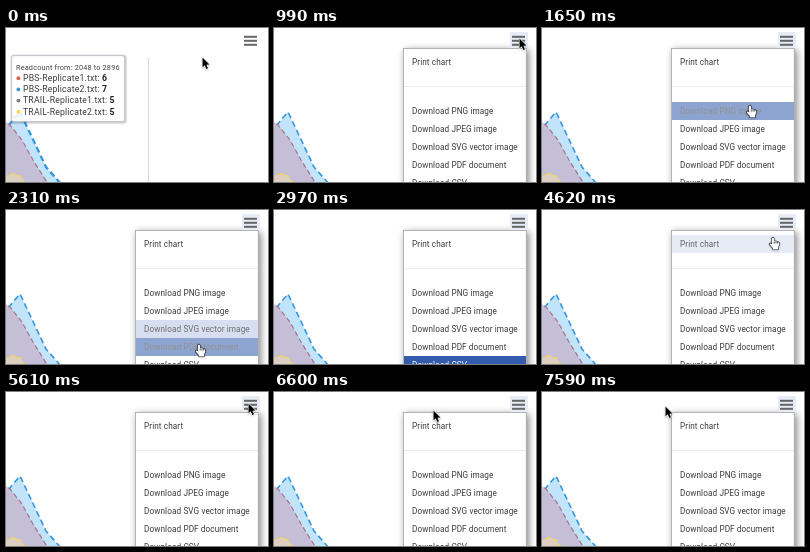
An HTML page with a canvas for the animation above (8000 ms loop, 262x154 px).

```html
<!DOCTYPE html>
<html lang="en">
<head>
<meta charset="utf-8">
<title>Chart export menu</title>
<style>
html, body { margin: 0; width: 100%; height: 100%; overflow: hidden; background: #fff; }
canvas { display: block; width: 262px; height: 154px; }
</style>
</head>
<body>
<canvas id="stage"></canvas>
<script>
const W = 262, H = 154, LOOP = 8000;
const canvas = document.getElementById('stage');
const ctx = canvas.getContext('2d');
const dpr = window.devicePixelRatio || 1;
canvas.width = W * dpr;
canvas.height = H * dpr;

const BLUE = '#3497e0';
const ENTER = .56, LEAVE = .2;
const items = [
  ['Print chart', 25], ['Download PNG image', 74], ['Download JPEG image', 92],
  ['Download SVG vector image', 110], ['Download PDF document', 128], ['Download CSV', 146]
];
const rows = [
  ['PBS-Replicate1.txt: ', 6, '#e2574c'], ['PBS-Replicate2.txt: ', 7, BLUE],
  ['TRAIL-Replicate1.txt: ', 5, '#7b7f88'], ['TRAIL-Replicate2.txt: ', 5, '#f7d442']
];

// at: start time, cur: pointer, hover: row index -> highlight strength
const steps = [
  { at: 0, cur: ['arrow', 196, 29], tip: 1 },
  { at: 330, cur: ['arrow', 229, 17], tip: .5 },
  { at: 660, cur: ['arrow', 245, 10], button: 1 },
  { at: 990, cur: ['arrow', 245, 10], menu: 1 },
  { at: 1320, cur: ['arrow', 211, 45], menu: 1 },
  { at: 1650, cur: ['hand', 204, 77], menu: 1, hover: { 1: ENTER } },
  { at: 1980, cur: ['hand', 196, 113], menu: 1, hover: { 2: LEAVE, 3: ENTER } },
  { at: 2310, cur: ['hand', 189, 134], menu: 1, hover: { 3: LEAVE, 4: ENTER } },
  { at: 2640, cur: ['hand', 188, 150], menu: 1, hover: { 4: LEAVE, 5: ENTER } },
  { at: 2970, menu: 1, hover: { 5: 1 } },
  { at: 3630, cur: ['hand', 197, 139], menu: 1, hover: { 5: ENTER } },
  { at: 3960, cur: ['hand', 201, 128], menu: 1, hover: { 4: ENTER } },
  { at: 4290, cur: ['hand', 216, 78], menu: 1, hover: { 1: ENTER, 2: LEAVE } },
  { at: 4620, cur: ['hand', 227, 27], menu: 1, hover: { 0: .12 } },
  { at: 4950, cur: ['arrow', 240, 15], menu: 1 },
  { at: 5280, cur: ['arrow', 242, 12], menu: 1 },
  { at: 5610, cur: ['arrow', 242, 11], menu: 1 },
  { at: 5940, cur: ['arrow', 245, 11], menu: 1 },
  { at: 6600, cur: ['arrow', 159, 18], menu: 1 },
  { at: 6930, cur: ['arrow', 130, 17], menu: 1 },
  { at: 7260, cur: ['arrow', 108, 2], menu: 1 },
  { at: 7590, cur: ['arrow', 123, 14], menu: 1 }
];

const mix = (a, b, t) => `rgb(${a.map((v, i) => Math.round(v + (b[i] - v) * t))})`;

function text(str, x, y, size, color, spacing, weight = 400) {
  ctx.font = `${weight} ${size}px Roboto, Arial, sans-serif`;
  ctx.letterSpacing = spacing + 'px';
  ctx.fillStyle = color;
  ctx.fillText(str, x, y);
  return ctx.measureText(str).width;
}

function trace(points) {
  ctx.beginPath();
  points.forEach(([x, y]) => ctx.lineTo(x, y));
}

function area(points, fill, stroke, width, dash) {
  trace([...points, [points[points.length - 1][0], 160], [-4, 160]]);
  ctx.fillStyle = fill;
  ctx.fill();
  trace(points);
  ctx.strokeStyle = stroke;
  ctx.lineWidth = width;
  ctx.setLineDash(dash);
  ctx.stroke();
  ctx.setLineDash([]);
}

function shadow(color, blur, dx, dy) {
  ctx.shadowColor = color;
  ctx.shadowBlur = blur * dpr;
  ctx.shadowOffsetX = dx * dpr;
  ctx.shadowOffsetY = dy * dpr;
}

function drawChart(active) {
  area([[-4, 105], [14, 84], [40, 139], [55, 156]], '#c1e4fb', BLUE, active ? 2.3 : 1.6, [6, 3.5]);
  area([[-4, 91], [4, 97], [16, 112], [27, 132], [42, 156]], 'rgba(198,184,210,.85)', '#b0708a', 1.2, [5, 3]);
  area([[-4, 149], [8, 145.5], [14, 148], [20, 156]], 'rgba(226,213,190,.8)', '#f2d54e', 1.4, [5, 3]);
  ctx.fillStyle = '#d8d8d8';
  ctx.fillRect(142, 30, 1, 124);
}

function drawButton(on) {
  if (on) {
    ctx.fillStyle = '#e6ebf5';
    ctx.fillRect(236, 4, 18, 16);
  }
  ctx.fillStyle = '#666';
  for (const y of [7.8, 11.8, 15.8]) ctx.fillRect(238, y, 13, 2);
}

function drawTooltip(alpha) {
  ctx.save();
  ctx.globalAlpha = alpha;
  // stacked translucent outlines make the soft edge
  ctx.strokeStyle = 'rgba(0,0,0,.08)';
  for (const width of [1, 2.5, 4]) {
    ctx.beginPath();
    ctx.roundRect(6.2, 28.2, 113, 66, 2);
    ctx.lineWidth = width;
    ctx.stroke();
  }
  ctx.beginPath();
  ctx.roundRect(5.5, 27.5, 113, 66, 2);
  ctx.fillStyle = 'rgba(255,255,255,.87)';
  ctx.fill();
  ctx.strokeStyle = '#b4bcc4';
  ctx.lineWidth = .7;
  ctx.stroke();
  text('Readcount from: 2048 to 2896', 10, 41.6, 7.3, '#444', .18);
  rows.forEach(([label, value, color], i) => {
    const y = 53 + i * 11.2;
    ctx.beginPath();
    ctx.arc(12.4, y - 2.8, 1.9, 0, 7);
    ctx.fillStyle = color;
    ctx.fill();
    const w = text(label, 17, y, 8.7, '#3a3a3a', .17);
    text(value, 17 + w, y, 8.7, '#222', .17, 700);
  });
  ctx.restore();
}

function drawMenu(hover = {}) {
  ctx.save();
  shadow('#888', 7.2, 2.2, 2.2);
  ctx.fillStyle = '#fff';
  ctx.fillRect(129, 20, 123.5, 160);
  ctx.restore();
  ctx.strokeStyle = '#a2a2a2';
  ctx.lineWidth = .8;
  ctx.strokeRect(129.5, 20.5, 122.8, 160);
  ctx.fillStyle = '#ebebeb';
  ctx.fillRect(130, 58, 122, 1);
  items.forEach(([label, y], i) => {
    const p = hover[i] || 0;
    if (p) {
      ctx.fillStyle = mix([255, 255, 255], [51, 92, 173], p);
      ctx.fillRect(130, y, 122, 18);
    }
    const t = p === 1 ? 1 : .6 * Math.sqrt(p);
    text(label, 138, y + 12.2, 8.2, mix([58, 58, 58], [255, 255, 255], t), .1);
  });
}

const shapes = {
  arrow: [[.5, .4], [.5, 10.4], [2.7, 8.3], [4.3, 12], [6, 11.3], [4.4, 7.7], [7.5, 7.4]],
  hand: [[2.8, 1], [4, .4], [4.9, 1.2], [5.2, 4.2], [7, 4.2], [8.6, 4.8], [10, 5.4],
    [10.3, 7.6], [9.2, 10.2], [9, 12.4], [4, 12.4], [3.6, 10.8], [.6, 7.6], [.7, 6.4], [2, 6.4], [3.2, 7.4]]
};

function drawCursor([kind, x, y]) {
  const arrow = kind === 'arrow';
  ctx.save();
  ctx.translate(x, y);
  trace(shapes[kind]);
  ctx.closePath();
  ctx.lineJoin = 'round';
  ctx.lineWidth = 1.1;
  ctx.strokeStyle = arrow ? '#fff' : '#111';
  ctx.fillStyle = arrow ? '#000' : '#fff';
  shadow('rgba(0,0,0,.3)', 2, 0, .7);
  ctx.stroke();
  shadow('transparent', 0, 0, 0);
  ctx.fill();
  if (!arrow) {
    ctx.lineWidth = .7;
    ctx.beginPath();
    for (const fx of [5.2, 7, 8.7]) {
      ctx.moveTo(fx, 4.6);
      ctx.lineTo(fx, 6.6);
    }
    ctx.stroke();
  }
  ctx.restore();
}

function draw(time) {
  const s = steps.findLast(step => step.at <= time);
  ctx.setTransform(dpr, 0, 0, dpr, 0, 0);
  ctx.fillStyle = '#fff';
  ctx.fillRect(0, 0, W, H);
  drawChart(s.tip === 1);
  if (s.tip) drawTooltip(s.tip);
  if (s.menu) drawMenu(s.hover);
  drawButton(s.menu || s.button);
  if (s.cur) drawCursor(s.cur);
}

const start = performance.now();
function tick() {
  draw((performance.now() - start) % LOOP);
  requestAnimationFrame(tick);
}
tick();
</script>
</body>
</html>
```
